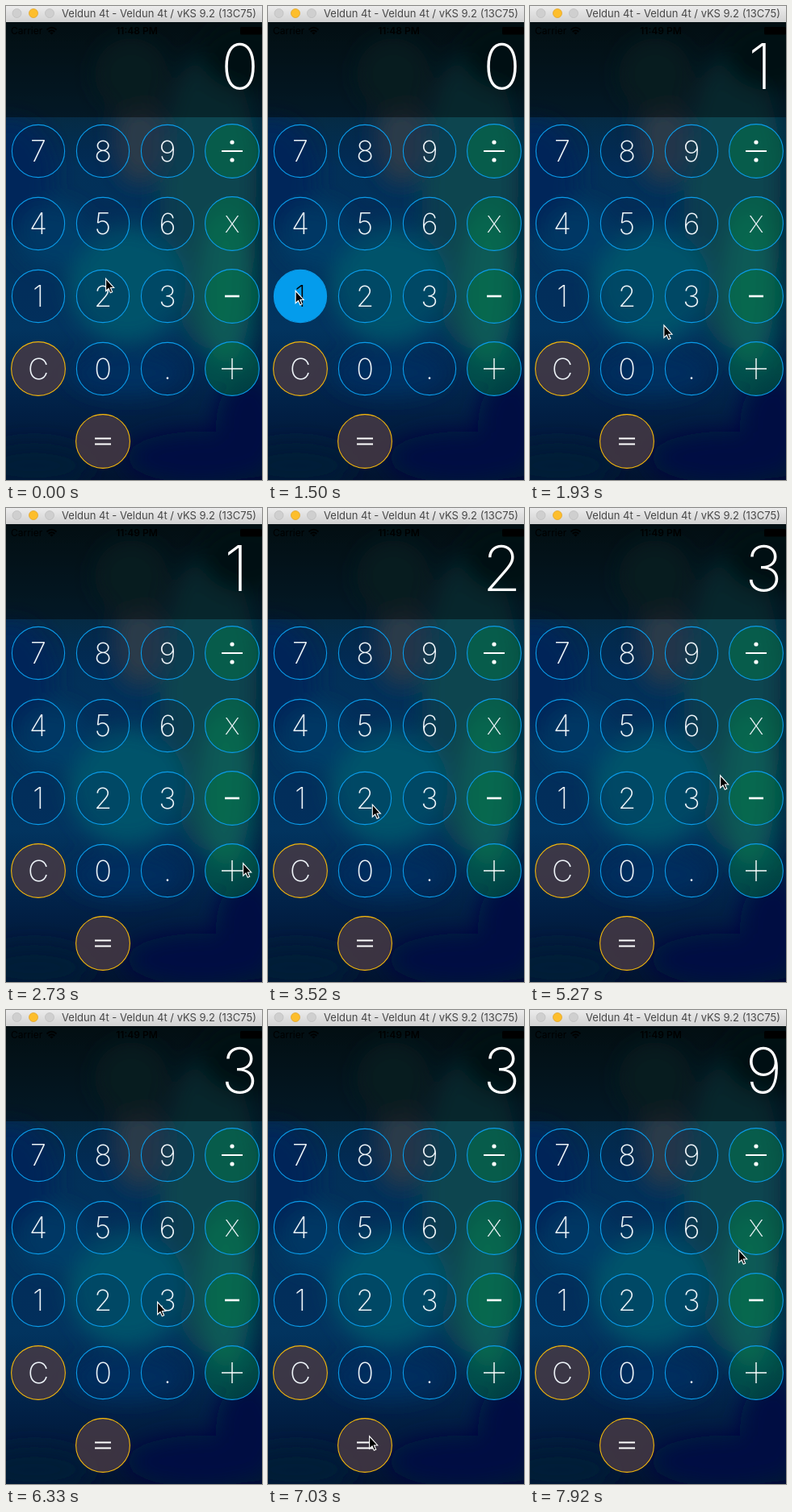
Write an HTML page that moves like this. It is 317 px wide and 588 px high and loops after 8 s.

```html
<!DOCTYPE html>
<html lang="en">
<head>
<meta charset="utf-8">
<title>Calculator</title>
<style>
  html, body { margin: 0; width: 100%; height: 100%; overflow: hidden; background: #021630; }
  svg { display: block; width: 317px; height: 588px; font-family: Inter, Roboto, sans-serif; }
  .key text { font-size: 36px; font-weight: 200; fill: #eef4f8; text-anchor: middle; }
  .key path { stroke: #fff; fill: none; }
  .digit circle { fill: #001c5030; stroke: #0a9be9; }
  .op circle { fill: #00784673; stroke: #0a9be9; }
  .cmd circle { fill: #493a44d0; stroke: #f3b60c; }
  .down text { fill: #000; }
  .down path { stroke: #000; }
  .digit.down circle { fill: #049cec; }
  .cmd.down circle { fill: #ea6404; stroke: #ea6404; }
  #display { font-size: 78px; font-weight: 200; fill: #fff; text-anchor: middle; }
</style>
</head>
<body>
<svg id="stage" viewBox="0 0 317 588">
  <defs>
    <filter id="soft" x="-50%" y="-50%" width="200%" height="200%"><feGaussianBlur stdDeviation="13"/></filter>
    <linearGradient id="bar" x2="0" y2="1">
      <stop stop-color="#ececec"/><stop offset="1" stop-color="#d2d2d2"/>
    </linearGradient>
    <linearGradient id="shade" x2="0" y2="1">
      <stop stop-color="#04171b"/><stop offset=".2" stop-color="#06293e"/>
      <stop offset=".34" stop-color="#023058"/><stop offset=".68" stop-color="#02345f"/>
      <stop offset=".86" stop-color="#011f44"/><stop offset="1" stop-color="#011330"/>
    </linearGradient>
  </defs>
  <rect width="317" height="588" fill="url(#shade)"/>
  <g id="backdrop" filter="url(#soft)"></g>
  <rect y="20" width="317" height="118" fill="#000" opacity=".45"/>

  <rect width="317" height="20" fill="url(#bar)"/>
  <g stroke-width=".7">
    <circle cx="13.5" cy="9" r="5.5" fill="#cfcfcf" stroke="#bcbcbc"/>
    <circle cx="34" cy="9" r="5.5" fill="#fdbe2c" stroke="#dfa023"/>
    <circle cx="54" cy="9" r="5.5" fill="#cfcfcf" stroke="#bcbcbc"/>
  </g>
  <text x="69" y="14" font-size="13" fill="#484848">Veldun 4t - Veldun 4t / vKS 9.2 (13C75)</text>

  <text x="6" y="35" font-size="12">Carrier</text>
  <g fill="none" stroke="#000" stroke-width="1.7">
    <path d="M50.5 29.5Q56.5 24 62.5 29.5M52.7 32Q56.5 28.5 60.3 32"/>
  </g>
  <path d="M54.3 33.3Q56.5 31.5 58.7 33.3L56.5 35.5Z"/>
  <text id="clock" x="162" y="35" font-size="12" font-weight="600" text-anchor="middle"></text>
  <rect x="290" y="26" width="27" height="9.5" rx="1.5"/>
  <text id="display" y="103"></text>
  <g id="keys"></g>
  <path id="cursor" d="M.6 .8V16.2L4 13 6.3 18.2 8.7 17.2 6.4 12H10.7Z" fill="#000" stroke="#fff" stroke-width="1.1"/>
</svg>
<script>
const $ = id => document.getElementById(id);

function add(parent, tag, attrs, text = "") {
  const el = document.createElementNS("http://www.w3.org/2000/svg", tag);
  for (const name in attrs) el.setAttribute(name, attrs[name]);
  el.textContent = text;
  return parent.appendChild(el);
}

// Blurred backdrop: x, y, radius x, radius y, colour
[
  [5, 210, 55, 70, "#01275a"],
  [252, 240, 62, 185, "#07454f"],
  [165, 165, 32, 55, "#2b3b4a"],
  [150, 345, 72, 72, "#04536a"],
  [272, 350, 32, 95, "#075a57"],
  [60, 285, 45, 40, "#033d68"],
  [150, 455, 70, 28, "#033262"],
  [318, 350, 9, 250, "#021531"],
  [240, 560, 90, 32, "#010f42"],
  [300, 520, 40, 60, "#010d42"],
  [35, 570, 70, 28, "#011b38"],
  [155, 85, 45, 45, "#0b3038"],
  [300, 60, 60, 45, "#041c22"]
].forEach(([cx, cy, rx, ry, fill]) => add($("backdrop"), "ellipse", { cx, cy, rx, ry, fill }));

// Operator strokes, relative to the key centre
const signs = {
  "÷": ["M-13 0H13", 2],
  "−": ["M-9 0H9", 2.6],
  "+": ["M-13 0H13M0-13V13", 1.4],
  "=": ["M-10-3.5H10M-10 3.5H10", 1.8]
};
const keys = {};

["789÷", "456X", "123−", "C0.+", " ="].forEach((row, r) => [...row].forEach((name, c) => {
  if (name === " ") return;
  const kind = "C=".includes(name) ? "cmd" : c === 3 ? "op" : "digit";
  const g = keys[name] = add($("keys"), "g", {
    class: "key " + kind, transform: `translate(${40 + 80 * c} ${180 + 90 * r})`
  });
  add(g, "circle", { r: kind === "digit" ? 32.6 : 33.4, "stroke-width": 1.1 });
  const sign = signs[name];
  if (sign) add(g, "path", { d: sign[0], "stroke-width": sign[1] });
  else add(g, "text", { y: name === "X" ? 10.5 : 13, style: name === "X" ? "font-size:29px" : "" }, name);
  if (name === "÷") for (const cy of [-11, 11])
    add(g, "circle", { cy, r: 2.6, style: "fill:#fff;stroke:none" });
}));

const LOOP = 8000, TICK = 87.85;

// Cursor moves: last tick at rest, arrival tick, x, y
const home = [123, 337.5];
const moves = [
  [2, 4, 119, 388], [5, 7, 119, 356], [12, 15, 33.5, 352.5],
  [18, 26, 297, 438], [26, 27, 293, 440], [31, 36, 120.5, 348.5],
  [39, 42, 152, 420], [42, 45, 118, 537], [51, 55, 187.5, 354],
  [57, 60, 235, 331], [60, 62, 278, 279], [65, 69, 187, 361.5],
  [73, 78, 121.5, 515], [78, 80, 125, 528], [87, 90, 258, 297]
];
const presses = { "1": 17, "=": 47, "3": 71 };
const results = [[0, 0], [18, 1], [38, 2], [48, 3], [82, 9]];

function cursorAt(n) {
  let [x, y] = home;
  for (const [from, to, tx, ty] of moves) {
    if (n <= from) break;
    const p = Math.min(1, (n - from) / (to - from)), e = p * p * (3 - 2 * p);
    x += (tx - x) * e;
    y += (ty - y) * e;
  }
  return [x, y];
}

function draw(now) {
  const n = Math.floor((now % LOOP + 8) / TICK);
  const value = results.filter(([at]) => n >= at).pop()[1];
  $("display").textContent = value;
  $("display").setAttribute("x", value === 1 ? 285 : 289.5);
  $("clock").textContent = n < 18 ? "11:48 PM" : "11:49 PM";
  for (const name in presses) keys[name].classList.toggle("down", n === presses[name]);
  $("cursor").setAttribute("transform", `translate(${cursorAt(n)})`);
}

const start = performance.now();
function loop() {
  draw(performance.now() - start);
  requestAnimationFrame(loop);
}
loop();
</script>
</body>
</html>
```
